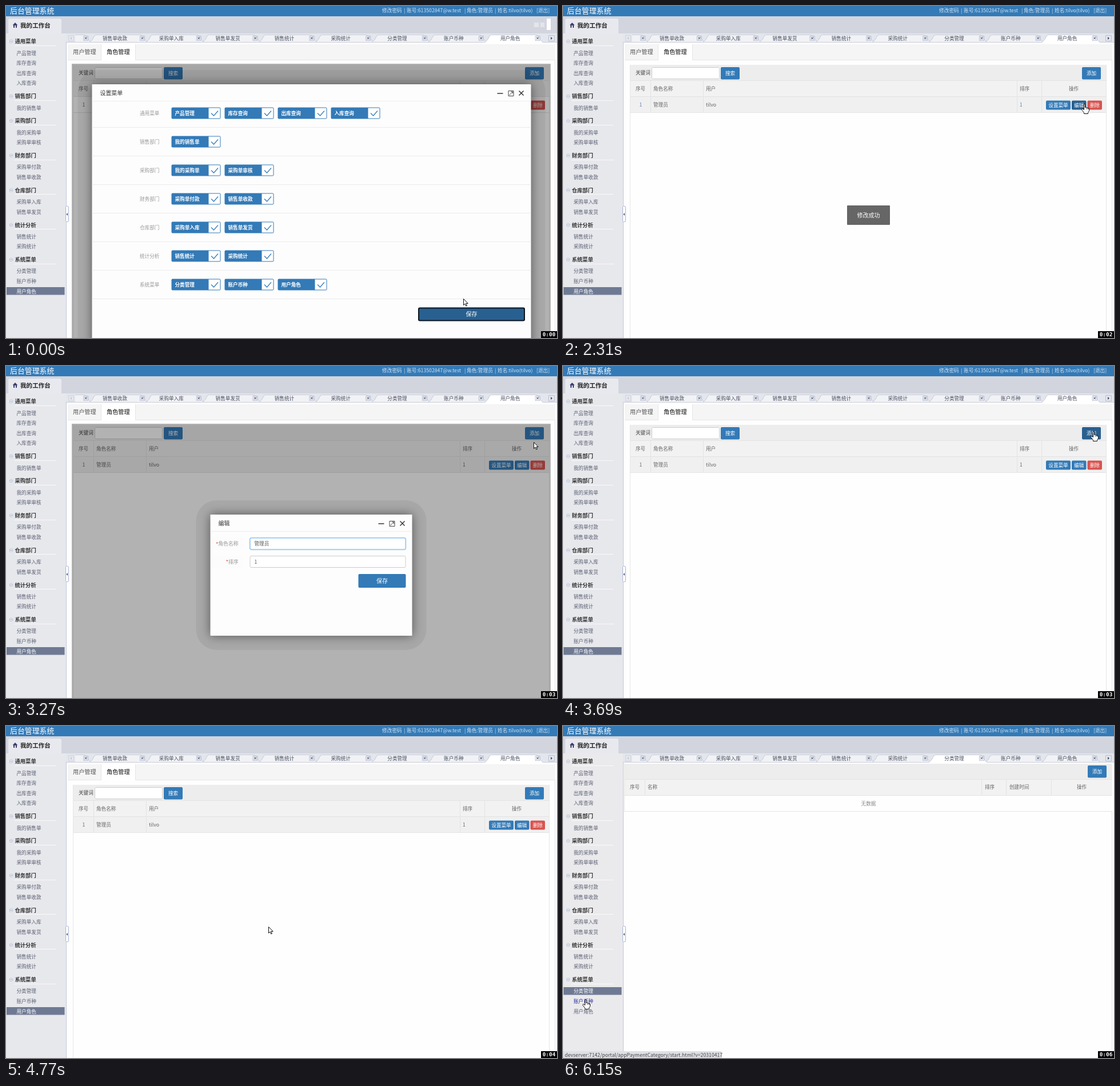
Animation of 964x581 px, one loop 6250 ms. Source, as an HTML page with a canvas:

```html
<!DOCTYPE html>
<html lang="zh">
<head>
<meta charset="utf-8">
<style>
html, body { margin: 0; width: 100%; height: 100%; overflow: hidden; }
canvas { display: block; }
</style>
</head>
<body>
<canvas id="stage" width="964" height="581"></canvas>
<script>
const ctx = document.getElementById('stage').getContext('2d');
const LOOP = 6250;
const STEPS = [0, 210, 430, 640, 850, 1060, 1160, 1370, 1580, 1790, 2000, 2210, 2310, 2520, 2740, 2950,
  3160, 3270, 3480, 3690, 3900, 4120, 4340, 4550, 4770, 4980, 5190, 5410, 5620, 5840, 6050, 6150];
const BLUE = '#337ab7', DARK = '#286090', RED = '#d9534f', GREY = '#666';
const FONT = '"Noto Sans CJK SC", "Noto Sans CJK JP", "Noto Sans CJK", "Noto Sans", sans-serif';
const USER = 'tilvo', MAIL = '613502847@w.test';
const ROW_HOVER = 1060; // the row stays shaded once the pointer has reached it
const SWITCH = 5410; // the category tab opens

const MENU = [
  ['通用菜单', '产品管理', '库存查询', '出库查询', '入库查询'],
  ['销售部门', '我的销售单'],
  ['采购部门', '我的采购单', '采购单审核'],
  ['财务部门', '采购单付款', '销售单收款'],
  ['仓库部门', '采购单入库', '销售单发货'],
  ['统计分析', '销售统计', '采购统计'],
  ['系统菜单', '分类管理', '账户币种', '用户角色']
];
const TABS = ['销售单收款', '采购单入库', '销售单发货', '销售统计', '采购统计', '分类管理', '账户币种', '用户角色'];

// time, x, y of the pointer tip
const PATH = [[0, 800, 512], [210, 797, 506], [640, 757, 371], [1060, 868, 174], [1900, 880, 172],
  [2310, 911, 171], [2520, 911, 171], [2950, 694, 275], [3120, 694, 275], [3270, 923, 133],
  [3480, 927, 114], [4150, 927, 114], [4520, 694, 275], [4600, 694, 275], [4980, 136, 456],
  [5190, 44, 461], [5620, 40, 462], [5840, 38, 478], [LOOP, 38, 478]];

function rect(x, y, w, h, color, r = 0) {
  ctx.fillStyle = color;
  ctx.beginPath();
  ctx.roundRect(x, y, w, h, r);
  ctx.fill();
}

function frame(x, y, w, h, color, r = 0, width = 1) {
  ctx.strokeStyle = color;
  ctx.lineWidth = width;
  ctx.beginPath();
  ctx.roundRect(x + .5, y + .5, w - 1, h - 1, r);
  ctx.stroke();
}

function line(color, width, ...points) {
  ctx.strokeStyle = color;
  ctx.lineWidth = width;
  ctx.beginPath();
  for (let i = 0; i < points.length; i += 2) ctx.lineTo(points[i], points[i + 1]);
  ctx.stroke();
}

function shape(points, fill, stroke) {
  ctx.beginPath();
  for (let i = 0; i < points.length; i += 2) ctx.lineTo(points[i], points[i + 1]);
  ctx.closePath();
  ctx.fillStyle = fill;
  ctx.fill();
  if (!stroke) return;
  ctx.strokeStyle = stroke;
  ctx.lineWidth = 1;
  ctx.stroke();
}

// y is the vertical middle of the glyphs
function text(s, x, y, color = GREY, size = 8.6, weight = 400, align = 'left') {
  ctx.font = `${weight} ${size}px ${FONT}`;
  ctx.textAlign = align;
  ctx.fillStyle = color;
  ctx.fillText(s, x, y + size * .37);
}

function button(label, x, y, w, h, color = BLUE, size = 8.6) {
  rect(x, y, w, h, color, 2);
  text(label, x + w / 2, y + h / 2, '#fff', size, 500, 'center');
}

function cross(x, y, r, color, width) {
  line(color, width, x - r, y - r, x + r, y + r);
  line(color, width, x + r, y - r, x - r, y + r);
}

const inside = (p, x, y, w, h) => p.x >= x && p.x < x + w && p.y >= y && p.y < y + h;

function pointerAt(t) {
  const i = PATH.findIndex(k => k[0] > t);
  const [t0, x0, y0] = PATH[i - 1], [t1, x1, y1] = PATH[i];
  const p = (t - t0) / (t1 - t0), e = p * p * (3 - 2 * p);
  return { x: Math.round(x0 + (x1 - x0) * e), y: Math.round(y0 + (y1 - y0) * e), hand: false };
}

function drawHeader(t) {
  rect(0, 0, 964, 18, BLUE);
  text('后台管理系统', 7, 8, '#fff', 12.9);
  const info = [['修改密码', 658], ['|', 696], ['账号:' + MAIL, 701], ['|', 802], ['角色:管理员', 806],
    ['|', 855], [`姓名:${USER}(${USER})`, 860], ['[退出]', 928]];
  for (const [s, x] of info) text(s, x, 8, '#d3e3f1', 8.7);
  rect(0, 18, 964, 30, '#d2d5de');
  rect(4, 22, 93, 27, '#e8e9ee', [3, 3, 0, 0]);
  shape([11.5, 33.5, 16, 29, 20.5, 33.5, 19, 33.5, 19, 38, 13, 38, 13, 33.5], '#3d3f70');
  rect(15, 34, 2, 4, '#e8e9ee');
  text('我的工作台', 25, 34, '#222', 10.6, 700);
  if (t < 430) {
    rect(924, 29, 8, 8, '#e3e5eb');
    rect(935, 29, 7, 8, '#e3e5eb');
    rect(946, 22, 7, 20, '#fdfdfe');
  }
}

function drawTab(i, active) {
  const x = 146 + 98.8 * i;
  const edge = [x, 63.5, x + 5, 59, x + 9, 51.5, x + 12, 50.5, x + 89, 50.5, x + 92, 51.5, x + 98, 60, x + 102, 63.5];
  shape(edge, active ? '#fff' : '#f1f2f5', '#c8ccd8');
  if (active) rect(x + 1, 63, 100, 2, '#fff');
  if (i >= 0) text(TABS[i], x + 44.5, 57, '#444a5c', 8.6, 400, 'center');
  frame(x + 88, 52, 9, 9, '#b9bfd0');
  cross(x + 92.4, 56.4, 2, '#6d7590', 1.2);
}

function drawTabs(active) {
  rect(105, 48, 859, 16, '#e4e6ed');
  line('#c8ccd8', 1, 105, 63.5, 964, 63.5);
  ctx.save();
  ctx.beginPath();
  ctx.rect(121, 48, 826, 18);
  ctx.clip();
  for (let i = -1; i < TABS.length; i++) if (i !== active) drawTab(i, false);
  drawTab(active, true);
  ctx.restore();
  frame(109, 51, 10, 11, '#d0d4df');
  shape([115, 54, 115, 59, 112.5, 56.5], '#c3c8d6');
  frame(949, 51, 11, 11, '#b9bfd0');
  shape([953, 54, 953, 59, 956, 56.5], '#444c70');
}

function drawSidebar(t, p) {
  rect(0, 48, 105, 533, t < SWITCH ? '#e7e8ec' : '#eaeaec');
  const selected = t < SWITCH ? '用户角色' : '分类管理';
  let y = 62;
  for (const [title, ...items] of MENU) {
    rect(6, y - 3, 6, 6, '#f4f6fb', 1);
    frame(6, y - 3, 6, 6, '#b6bfd6', 1);
    line('#8c98ba', 1, 7.5, y, 10.5, y);
    text(title, 15.5, y, '#333', 9.3, 700);
    line('#fafafc', 1, 15, Math.round(y + 7) + .5, 88, Math.round(y + 7) + .5);
    y += 20.5;
    for (const item of items) {
      const on = item === selected;
      const over = inside(p, 1, y - 8, 102, 17);
      p.hand ||= over;
      if (on) rect(1, Math.floor(y - 7), 101.5, 13.5, '#6f7a92');
      text(item, 18.5, y, on ? '#fff' : over ? '#2a2aa8' : '#5a5e72');
      y += 17.6;
    }
    y += 5;
  }
  line('#c3c8da', 1, 105.5, 48, 105.5, 581);
  rect(104, 350, 6, 28, '#fff', 1);
  frame(104, 350, 6, 28, '#a9b3d4', 1);
  shape([108, 362, 108, 367, 105.5, 364.5], '#4a5580');
}

// Toolbar, header row and one body row, shared by both pages
function drawTable(x, y, w, columns, columnHeight, rowColor) {
  rect(x, y, w, 27, '#ededed');
  rect(x, y + 27, w, 28, '#f2f2f2');
  rect(x, y + 55, w, 28, rowColor);
  for (const dy of [27, 55, 83]) line('#e3e3e3', 1, x, y + dy + .5, x + w, y + dy + .5);
  for (const c of columns) line('#e3e3e3', 1, c + .5, y + 27, c + .5, y + 27 + columnHeight);
}

function drawRoles(t, p, blocked) {
  const over = (...box) => {
    const hit = !blocked && inside(p, ...box);
    p.hand ||= hit;
    return hit;
  };
  const act = (label, x, y, w, h, color = BLUE, hover = DARK) =>
    button(label, x, y, w, h, over(x, y, w, h) ? hover : color);
  rect(108, 67, 853, 27, '#f5f5f5');
  line('#e6e6e6', 1, 108, 94.5, 961, 94.5);
  rect(166, 67, 61, 28, '#fff');
  line('#e6e6e6', 1, 166.5, 67, 166.5, 95);
  line('#e6e6e6', 1, 226.5, 67, 226.5, 95);
  text('用户管理', 117, 80.5, '#555', 10.2);
  text('角色管理', 176, 80.5, '#111', 10.2);

  drawTable(117, 103, 834, [153, 245, 794, 837], 56, t < ROW_HOVER ? '#fff' : '#f0f0f0');
  line('#e6e6e6', 1, 117.5, 103, 117.5, 581);
  line('#e6e6e6', 1, 950.5, 103, 950.5, 581);
  text('关键词', 127, 117, '#444');
  rect(155, 107, 119, 21, '#fff', 2);
  frame(155, 107, 119, 21, '#ccc', 2);
  act('搜索', 276, 107, 33, 21.5);
  act('添加', 908, 107, 33, 21.5);
  for (const [s, x] of [['序号', 127], ['角色名称', 158], ['用户', 250], ['排序', 799], ['操作', 885]]) text(s, x, 144.5);
  const number = !blocked && inside(p, 118, 159, 833, 28) ? '#5580a8' : GREY;
  text('1', 133.5, 173, number);
  text('管理员', 158, 173);
  text(USER, 250, 173, GREY, 8.8);
  text('1', 799, 173, number);
  act('设置菜单', 845, 165.5, 43, 16);
  act('编辑', 890, 165.5, 25.5, 16);
  act('删除', 917.5, 165.5, 25.5, 16, RED, '#c9302c');
}

function drawCategories() {
  drawTable(108, 66, 853, [143, 732, 775, 854], 28, '#fefefe');
  line('#e3e3e3', 1, 107.5, 66, 107.5, 150);
  button('添加', 918, 69, 33, 21.5);
  for (const [s, x] of [['序号', 117], ['名称', 148], ['排序', 738], ['创建时间', 781], ['操作', 899]]) text(s, x, 106.5);
  text('无数据', 534.5, 135.5, '#888', 8.6, 400, 'center');
}

function menuBody() {
  MENU.forEach(([title, ...items], row) => {
    const y = 50.5 + 50 * row;
    text(title, 83.5, y, '#999');
    items.forEach((item, i) => {
      const x = Math.round(139 + 93.1 * i);
      rect(x, y - 10, 86, 20, BLUE, 2);
      rect(x + 65, y - 9, 20, 18, '#fff');
      text(item, x + 6, y, '#fff', 8.6, 700);
      line(BLUE, 1.2, x + 69.5, y, x + 74, y + 4.5, x + 81.5, y - 4);
    });
    line('#ebebeb', 1, 0, y + 25, 768, y + 25);
  });
  rect(571, 391, 186, 23, DARK, 2);
  frame(571, 391, 186, 23, '#0b1520', 2, 2);
  text('保存', 664, 402.5, '#fff', 10, 500, 'center');
}

function formBody(name, order, labelColor) {
  ['角色名称', '排序'].forEach((label, i) => {
    const y = 40.5 + 31.5 * i;
    rect(2, y, 55, 21, labelColor);
    text(label, 49, y + 10.5, '#999', 8.8, 400, 'right');
    text('*', 49 - 8.8 * label.length, y + 11, '#e03030', 8.8, 400, 'right');
    rect(69, y, 273, 21, '#fff', 2);
    if (!i) frame(68, y - 1, 275, 23, '#cfe5f8', 3);
    frame(69, y, 273, 21, i ? '#ccc' : '#66afe9', 2);
  });
  text(name, 77, 51, '#555');
  text(order, 77, 82.5, '#555');
  button('保存', 259, 104, 83, 24, BLUE, 10);
}

const DIALOGS = [
  { open: -1000, close: 205, w: 768, h: 458, title: '设置菜单', body: menuBody },
  { open: 2350, close: 3275, w: 353, h: 212, title: '编辑', body: () => formBody('管理员', '1', '#fcfcfc') },
  { open: 3909, close: 4560, w: 353, h: 212, title: '添加', body: () => formBody('|', '', '#f4f4f4') }
];

// Drops in small from above, then grows; bounces slightly and shrinks on closing
function dialogPose(d, t) {
  const mix = (a, b, p) => a + (b - a) * p;
  if (t >= d.close) {
    const p = (t - d.close) / 200;
    return p < .3 ? { scale: mix(1, 1.05, p / .3), dy: 0, alpha: 1 }
      : { scale: mix(1.05, .7, (p - .3) / .7), dy: 0, alpha: 1 - (p - .3) / .7 };
  }
  const p = Math.min(1, (t - d.open) / 300);
  if (p < .6) return { scale: mix(.1, .475, p / .6), dy: mix(-1440, 43, p / .6), alpha: p / .6 };
  const q = (p - .6) / .4;
  return { scale: mix(.475, 1, q), dy: mix(43, 0, q), alpha: 1 };
}

function drawDialog(d, t) {
  const { scale, dy, alpha } = dialogPose(d, t);
  const { w, h } = d;
  ctx.save();
  ctx.beginPath();
  ctx.rect(115, 101, 838, 480);
  ctx.clip();
  rect(115, 101, 838, 480, 'rgba(0,0,0,.3)');
  ctx.globalAlpha = alpha;
  ctx.translate(534.5, 366 + dy * scale);
  ctx.scale(scale, scale);
  ctx.translate(Math.round(-w / 2 - .5), -h / 2);
  rect(-25, -25, w + 50, h + 50, 'rgba(0,0,0,.06)', 36);
  ctx.shadowColor = 'rgba(0,0,0,.5)';
  ctx.shadowBlur = 18 * scale;
  rect(0, 0, w, h, '#fdfdfd', 1);
  ctx.shadowColor = 'transparent';
  line('#eee', 1, 0, 29.5, w, 29.5);
  text(d.title, 14, 15, '#333', 9.9);
  line('#333', 1.5, w - 59, 16, w - 49, 16);
  frame(w - 40, 11, 10, 10, '#444');
  line('#444', 1, w - 38, 19, w - 32, 13);
  line('#444', 1, w - 35, 13, w - 32, 13, w - 32, 16);
  cross(w - 17, 15.5, 4, '#333', 1.4);
  d.body();
  ctx.restore();
}

function drawPointer({ x, y, hand }) {
  ctx.save();
  ctx.translate(x + .5, y + .5);
  if (hand) {
    shape([0, 0, 2, 0, 2, 6, 4, 5.5, 5, 7, 7, 6.5, 8, 8, 9, 8, 9, 12, 7, 15, 7, 17, 0, 17, 0, 15, -4, 10, -3, 8, 0, 10], '#fff', '#111');
    for (const cx of [4.5, 7]) line('#111', .7, cx, 7, cx, 9.5);
  } else {
    shape([0, 0, 0, 11, 2.5, 8.5, 4.2, 12.5, 6, 11.7, 4.3, 8, 7.7, 8], '#fff', '#111');
  }
  ctx.restore();
}

function drawStatus(t, p) {
  if (t < 5190) return;
  rect(0, 569, 278, 12, '#dfe0e6', [0, 2, 0, 0]);
  const page = p.y < 473 ? 'appGoodsKind' : 'appPaymentCategory';
  text(`devserver:7142/portal/${page}/start.html?v=20310417`, 3, 576, '#444', 8.7);
}

function drawClock(t) {
  rect(936, 569, 28, 12, '#000');
  ctx.font = 'bold 9.4px "DejaVu Sans Mono", monospace';
  ctx.textAlign = 'center';
  ctx.fillStyle = '#fff';
  ctx.fillText('0:0' + Math.floor((t + 100) / 1000), 950, 578.3);
}

function draw(t) {
  const pointer = pointerAt(t);
  const dialog = DIALOGS.find(d => t >= d.open && t < d.close + 200);
  rect(0, 0, 964, 581, '#fefefe');
  drawHeader(t);
  drawSidebar(t, pointer);
  drawTabs(t < SWITCH ? 7 : 5);
  line('#e1e4ec', 1, 960.5, 66, 960.5, 581);
  if (t < SWITCH) drawRoles(t, pointer, !!dialog);
  else drawCategories();
  if (t >= 430 && t < 3430) {
    rect(497, 349, 75, 34, '#666', 1);
    text('修改成功', 534.5, 366, '#fff', 10, 500, 'center');
  }
  if (dialog) drawDialog(dialog, t);
  drawStatus(t, pointer);
  drawPointer(pointer);
  drawClock(t);
}

function tick() {
  const now = performance.now() % LOOP;
  draw(STEPS.findLast(s => s <= now));
  requestAnimationFrame(tick);
}
tick();
</script>
</body>
</html>
```
